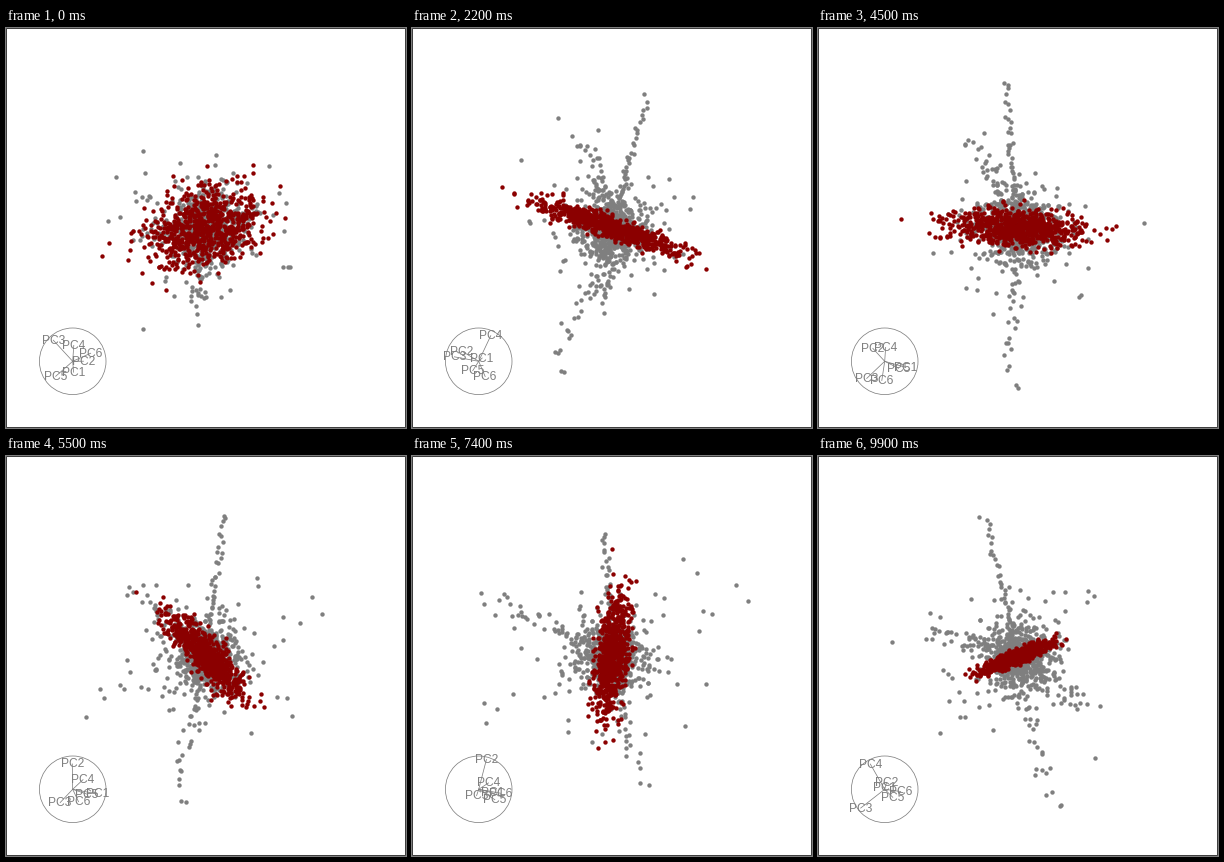
Recreate the animation shown at these times as a matplotlib script. Size 400 by 400 pixels, loop 10 s.

```python
import numpy as np
import matplotlib.pyplot as plt
from matplotlib.animation import FuncAnimation
from matplotlib.patches import Circle, Rectangle

SIZE, DPI = 400, 100
FRAMES, INTERVAL = 100, 100
PX = 72 / DPI
LINE = 0.75 * PX
GREY, RED = "#7f7f7f", "#8b0000"
HUB, RADIUS = np.array([66.7, 333.3]), 33.3
MID = 200
rng = np.random.default_rng(6)


def orthonormal(m):
    u, _, vt = np.linalg.svd(m, full_matrices=False)
    return u @ vt


# Poses of the tour: frame, then x and y of the six axes (unit circle, y up)
POSES = [
    (0, [.03, .33, -.60, .03, -.52, .55], [-.33, 0, .64, .48, -.45, .24]),
    (12, [-.25, -.12, -.76, .33, -.18, .48], [-.15, .39, .24, .82, -.15, -.21]),
    (31, [.39, -.76, -.52, .18, -.09, -.06], [.30, .24, .12, .55, -.33, -.64]),
    (45, [.64, -.36, -.55, .03, .42, -.09], [-.18, .39, -.52, .42, -.21, -.58]),
    (65, [.67, .18, -.03, .45, .33, .45], [-.21, .94, -.12, .03, -.12, -.12]),
    (82, [.15, .27, -.09, .12, .55, .76], [0, .79, -.24, .33, -.45, -.09]),
    (99, [0, .06, -.73, -.42, .24, .48], [.06, .21, -.58, .76, -.24, -.06]),
]
STOPS = [stop for stop, _, _ in POSES]
BASES = [orthonormal(np.column_stack(xy)) for _, *xy in POSES]


def basis_at(i):
    k = min(np.searchsorted(STOPS, i, side="right") - 1, len(STOPS) - 2)
    t = (i - STOPS[k]) / (STOPS[k + 1] - STOPS[k])
    return orthonormal(np.sin(1 - t) * BASES[k] + np.sin(t) * BASES[k + 1])


def fit_cov(*views, rounds=400):
    """6-D covariance from (sd x, sd y, correlation) at each pose, by EM."""
    cov = 200 * np.eye(6)
    for _ in range(rounds):
        step = 0
        for b, (sx, sy, r) in zip(BASES, views):
            goal = np.array([[sx * sx, r * sx * sy], [r * sx * sy, sy * sy]])
            seen = b.T @ cov @ b
            gain = cov @ b @ np.linalg.inv(seen)
            step = step + gain @ (goal - seen) @ gain.T
        cov = cov + step / len(views)
    return (cov + cov.T) / 2


def ball(n, sd, df=4, limit=3):
    """Round heavy-tailed cloud."""
    tail = np.minimum(np.sqrt(df / rng.chisquare(df, (n, 1))), limit)
    return sd * tail * rng.normal(size=(n, 6))


def arm(n, noise, *tip, power=1.8):
    """Points thinning out from the middle towards tip."""
    s = np.linspace(0, 1, n)[:, None] ** power
    return s * tip + noise * (0.5 + s) * rng.normal(size=(n, 6))


def strays(n, noise, *tip):
    """A few points far out on both sides of the middle."""
    s = rng.uniform(.6, 1.1, (n, 1)) * rng.choice([-1, 1], (n, 1))
    return s * tip + noise * rng.normal(size=(n, 6))


red = rng.multivariate_normal(np.zeros(6), fit_cov(
    (27, 17, .35), (23, 24, -.9), (40, 10, -.5), (32, 9, .05),
    (8, 32, -.1), (12, 27, .75), (18, 8, .9)), 760)

grey = np.vstack([
    ball(640, 15),
    arm(55, 1.6, -11, 80, -58, 100, -40, -55),
    arm(45, 4, -30, -75, 75, -90, 80, 70),
    arm(65, 5, -5, 22, 15, 0, -95, -120),
    arm(60, 5, 12, 0, -34, -74, 54, 0),
    strays(10, 9, 75, 75, -50, 30, 30, 70),
])

fig = plt.figure(figsize=(SIZE / DPI, SIZE / DPI), dpi=DPI, facecolor="white")
ax = fig.add_axes([0, 0, 1, 1])
ax.set(xlim=(0, SIZE), ylim=(SIZE, 0))
ax.axis("off")
ax.add_patch(Rectangle((.5, .5), SIZE - 1, SIZE - 1, fill=False,
                       ec="black", lw=LINE, snap=False))
ax.add_patch(Circle(HUB, RADIUS, fill=False, ec=GREY, lw=LINE))
spokes = [ax.plot([], [], color=GREY, lw=LINE)[0] for _ in range(6)]
labels = [ax.text(0, 0, f"PC{k + 1}", color=GREY, fontsize=12 * PX,
                  family="Liberation Sans", ha="center",
                  va="center_baseline") for k in range(6)]
layers = [(data, ax.plot([], [], "o", color=c, ms=4.4 * PX, mew=0,
                         zorder=5)[0])
          for data, c in ((grey, GREY), (red, RED))]


def update(i):
    b = basis_at(i) * [1, -1]
    for line, label, end in zip(spokes, labels, HUB + RADIUS * b):
        line.set_data([HUB[0], end[0]], [HUB[1], end[1]])
        label.set_position(end - [0, 1])
    for data, dots in layers:
        dots.set_data(*(MID + data @ b).T)
    return [*spokes, *labels, *(dots for _, dots in layers)]


anim = FuncAnimation(fig, update, frames=FRAMES, interval=INTERVAL,
                     repeat=True, repeat_delay=0, blit=False)
plt.show()
```
